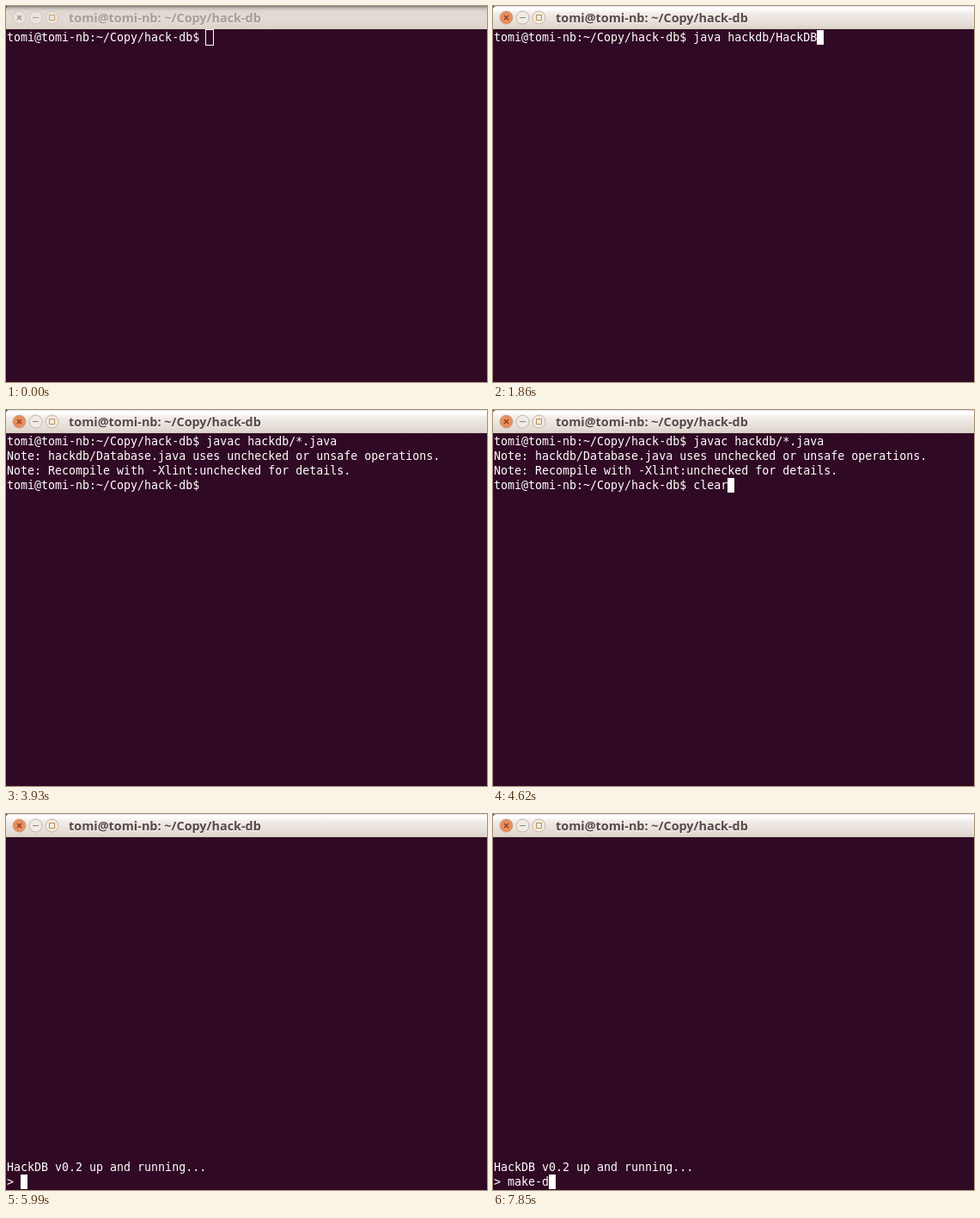
Animation, 560 px wide and 437 px high, one loop 8 s. Source, as an HTML page:

```html
<!DOCTYPE html>
<html lang="en">
<head>
<meta charset="utf-8">
<title>Terminal</title>
<style>
html, body { margin: 0; width: 100%; height: 100%; overflow: hidden; background: #300a24; }
#stage { position: relative; width: 560px; height: 437px; overflow: hidden; background: #300a24; }
#bar {
  position: absolute; left: 0; top: 0; width: 560px; height: 27px;
  background: linear-gradient(#c9c5c1 0, #fff 1px, #fefdfd 4px, #f3eeea 8px, #e9e3dd 16px, #ded6cc 26px, #cfc6bb 26px);
}
#bar::before {
  content: ""; position: absolute; left: 0; top: 0; width: 4px; height: 4px;
  background: radial-gradient(circle at 4px 4px, transparent 3.6px, #5d5658 4.4px);
}
#title {
  position: absolute; left: 73px; top: 3px; line-height: 21px; white-space: pre;
  font: bold 14.4px/21px "Open Sans", "Noto Sans", sans-serif;
  color: #574a4a; text-shadow: 0 1px #f8f5f2;
}
#bar svg { position: absolute; left: 0; top: 0; }
.ring { fill: #f0ebe4; stroke: #c0b5a8; }
.close { fill: #e98d5c; stroke: #c5a58f; }
.cross { stroke: #8c3f22; }
.dash { stroke: #8f857c; }
.square { stroke: #c08a4c; }
.blur #bar {
  background: linear-gradient(#747170 0, #9d9995 1px, #c6c0ba 3px, #dfd9d2 6px, #e2dbd3 15px, #ddd5cb 26px, #d5ccc1 26px);
}
.blur #title { color: #a59e96; text-shadow: 0 1px #ece7e1; }
.blur .ring, .blur .close { fill: #e9e3dc; stroke: #cfc6bc; }
.blur .cross, .blur .dash { stroke: #a0968d; }
.blur .square { stroke: #cfa067; }
#text {
  position: absolute; left: 1px; top: 28px; margin: 0; color: #fff;
  font: 13.3px/17px "DejaVu Sans Mono", monospace; white-space: pre;
}
#caret { position: absolute; width: 8px; height: 17px; background: #fff; }
.blur #caret { width: 10px; height: 19px; margin: -1px 0 0 -1px; box-sizing: border-box; background: none; border: 1px solid #fff; }
#mouse { position: absolute; left: 0; top: 0; }
</style>
</head>
<body>
<div id="stage" class="blur">
  <div id="bar">
    <svg width="66" height="27" fill="none">
      <circle class="close" cx="15.5" cy="13.5" r="7.5"/>
      <circle class="ring" cx="34.5" cy="13.5" r="7.5"/>
      <circle class="ring" cx="53.5" cy="13.5" r="7.5"/>
      <path class="cross" stroke-width="1.4" d="M13 11l5 5m0-5l-5 5"/>
      <path class="dash" d="M31 13.5h7"/>
      <path class="square" d="M50.5 10.5h6v6h-6z"/>
    </svg>
    <div id="title"></div>
  </div>
  <pre id="text"></pre>
  <div id="caret"></div>
  <svg id="mouse" width="11" height="18" fill="none">
    <path stroke="#16050f" stroke-width="3" d="M2.5 2.5h6M5.5 2v13M2.5 14.5h6"/>
    <path stroke="#e9e5e8" d="M3 2.5h2m1 0h2M5.5 3v11M3 14.5h2m1 0h2"/>
  </svg>
</div>
<script>
const LOOP = 8000;
const $ = id => document.getElementById(id);
const [stage, title, text, caret, mouse] = ["stage", "title", "text", "caret", "mouse"].map($);

const host = "tomi@tomi-nb";
const prompt = host + ":~/Copy/hack-db$ ";
const compile = "javac hackdb/*.java";
const run = "java hackdb/HackDB";
const first = prompt + compile + "\n";
const notes = first +
  "Note: hackdb/Database.java uses unchecked or unsafe operations.\n" +
  "Note: Recompile with -Xlint:unchecked for details.\n" + prompt;
const shell = "\n".repeat(22) + "HackDB v0.2 up and running...\n> ";

// [start in ms, screen text, caret visible]
const steps = [
  [0, prompt, 1],
  [1350, prompt, 0],
  [1510, prompt + "clear", 1],
  [1860, prompt + run, 1],
  [2180, prompt + compile, 1],
  [2750, prompt + compile, 0],
  [2930, first, 1],
  [3540, first, 0],
  [3930, notes, 0],
  [4090, notes, 1],
  [4310, notes + compile, 1],
  [4620, notes + "clear", 1],
  [5180, notes + "clear", 0],
  [5220, notes + run, 1],
  [5780, notes + run, 0],
  [5850, notes + run + "\n", 1],
  [5990, shell, 1],
  [6430, shell, 0],
  ...[6990, 7090, 7180, 7280, 7610, 7850].map((at, i) => [at, shell + "make-d".slice(0, i + 1), 1])
];

// [start in ms, x, y] of the pointer
const moves = [[570, 536, 112], [640, 496, 138], [700, 466, 153]];
const FOCUS = 770, HIDE = 1550;

const latest = (list, t) => list.filter(item => item[0] <= t).pop();

function draw(t) {
  const [, screen, on] = latest(steps, t);
  if (text.textContent !== screen) text.textContent = screen;
  const lines = screen.split("\n");
  caret.style.left = 1 + 8 * lines[lines.length - 1].length + "px";
  caret.style.top = 28 + 17 * (lines.length - 1) + "px";
  caret.style.visibility = on ? "visible" : "hidden";
  stage.className = t < FOCUS ? "blur" : "";

  const spot = t < HIDE && latest(moves, t);
  mouse.style.visibility = spot ? "visible" : "hidden";
  if (spot) mouse.style.transform = `translate(${spot[1] - 5}px, ${spot[2] - 8}px)`;
}

title.textContent = host + ": ~/Copy/hack-db";
const start = performance.now();
function tick() {
  draw((performance.now() - start) % LOOP);
  requestAnimationFrame(tick);
}
tick();
</script>
</body>
</html>
```
